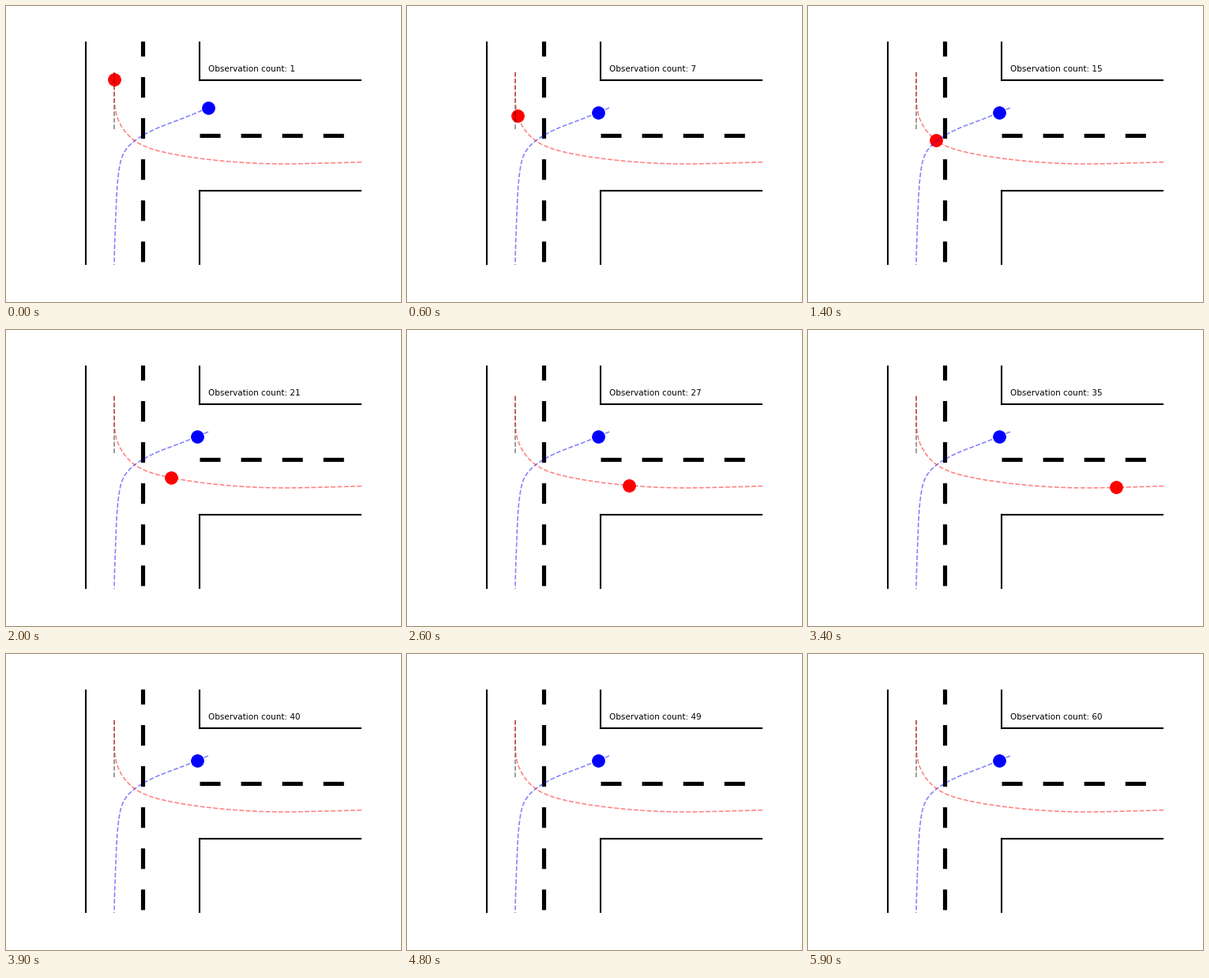
Recreate the animation shown at these times as a matplotlib script. Size 500 by 375 pixels, loop 6000 ms.

```python
import numpy as np
import matplotlib.pyplot as plt
from matplotlib.animation import FuncAnimation

W, H, DPI = 500, 375, 75
FRAMES, INTERVAL = 60, 100
LEFT, RIGHT, TOP, BOTTOM = 62.5, 450, 45, 328.125


def spline(t, v, q):
    """Natural cubic spline through (t, v), evaluated at q."""
    n, h = len(t), np.diff(t)
    slope = np.diff(v) / h
    A, b = np.eye(n), np.zeros(n)
    for k in range(1, n - 1):
        A[k, k - 1:k + 2] = h[k - 1], 2 * (h[k - 1] + h[k]), h[k]
        b[k] = 6 * (slope[k] - slope[k - 1])
    m = np.linalg.solve(A, b)
    k = np.clip(np.searchsorted(t, q) - 1, 0, n - 2)
    d, hk = q - t[k], h[k]
    lin = slope[k] - hk * (2 * m[k] + m[k + 1]) / 6
    return v[k] + d * (lin + d * (m[k] / 2 + d * (m[k + 1] - m[k]) / (6 * hk)))


class Route:
    """Smooth curve through waypoints, addressed by distance travelled."""

    def __init__(self, *points):
        p = np.array(points, float)
        t = np.r_[0, np.cumsum(np.hypot(*np.diff(p, axis=0).T))]
        q = np.linspace(0, t[-1], 900)
        self.x, self.y = spline(t, p[:, 0], q), spline(t, p[:, 1], q)
        steps = np.hypot(np.diff(self.x), np.diff(self.y))
        self.dist = np.r_[0, np.cumsum(steps)]

    def at(self, s):
        return np.interp(s, self.dist, self.x), np.interp(s, self.dist, self.y)


red = Route((137, 83.5), (137, 105), (140, 138.5), (162, 170), (200, 185.2),
            (245, 193), (345, 200), (450, 197.8), (490, 197.6))
blue = Route((256, 129), (222, 143), (173, 164), (149, 186.5), (143, 208),
             (139, 265), (137, 328), (137, 340))


def braked(i, steps, extra):
    """Extra distance covered while slowing down evenly over some steps."""
    return extra * (1 - (1 - min(i / steps, 1)) ** 2)


def red_travel(i):
    """Brake into the turn, crawl, then pull away towards a top speed."""
    crawl, gain, ramp, go = 4.8, 9.5, 5.8, 14
    k = max(i - go, 0)
    pull = gain * (k - ramp * (1 - np.exp(-k / ramp)))
    return 9.5 + crawl * i + braked(i, 6, 17.3) + pull


def blue_travel(i):
    return braked(i, 5, 15.6)


fig = plt.figure(figsize=(W / DPI, H / DPI), dpi=DPI, facecolor="white")
ax = fig.add_axes([LEFT / W, 1 - BOTTOM / H,
                   (RIGHT - LEFT) / W, (BOTTOM - TOP) / H])
ax.set_xlim(LEFT, RIGHT)
ax.set_ylim(BOTTOM, TOP)
ax.axis("off")

# Road edges
ax.plot((101, 101), (TOP, BOTTOM), color="black", lw=2)
for wall, end in [(94, TOP), (234, BOTTOM)]:
    ax.plot((245, 245), (wall, end), color="black", lw=2)
    ax.plot((245, RIGHT), (wall, wall), color="black", lw=2)

# Lane markings
for xs, ys in [((172.7, 172.7), (376, 30)), ((245, RIGHT), (163.7, 163.7))]:
    ax.plot(xs, ys, color="black", lw=5, ls=(0, (5, 5)))

red_car, = ax.plot([], [], "o", color="red", ms=15)
blue_car, = ax.plot([], [], "o", color="blue", ms=15)

# Predicted routes
for xs, ys, color in [((137, 137), (83.7, 156.5), "black"),
                      (blue.x, blue.y, "blue"), (red.x, red.y, "red")]:
    ax.plot(xs, ys, "--", color=color, lw=1.5, alpha=0.5)

label = ax.text(256, 83, "", fontsize=10, family="DejaVu Sans")


def update(i):
    for car, route, travel in [(red_car, red, red_travel),
                               (blue_car, blue, blue_travel)]:
        x, y = route.at(travel(i))
        car.set_data([x], [y])
    label.set_text(f"Observation count: {i + 1}")
    return red_car, blue_car, label


anim = FuncAnimation(fig, update, frames=FRAMES, interval=INTERVAL,
                     repeat=True, repeat_delay=0)
plt.show()
```
